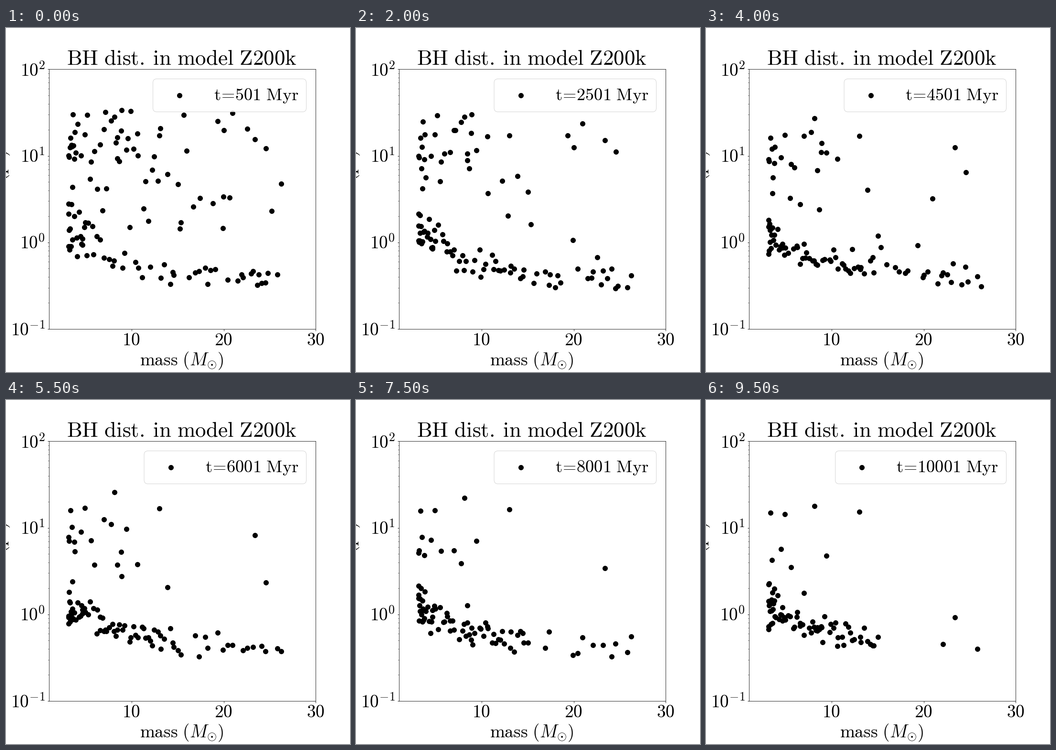
Write a matplotlib script that moves like this. It is 720 px wide and 720 px high and loops after 10 s.

```python
import numpy as np
import matplotlib.pyplot as plt
from matplotlib.animation import FuncAnimation
from matplotlib.patches import FancyBboxPatch

SIZE, FRAMES, INTERVAL = 720, 20, 500
COUNT = 128
HEAVY = 360  # stars right of this are lost over time

# Prominent outer stars: place, starting height, step at which they have sunk.
PROMINENT = np.array([
    (131, 267, 22), (132, 270, 21.5), (135, 230, 65), (138, 248, 25),
    (140, 181, 10), (143, 274, 22), (157, 267, 29), (165, 223, 46),
    (205, 212, 21), (227, 186, 38), (233, 273, 16), (241, 215, 15),
    (252, 255, 27), (275, 221, 14), (321, 225, 60), (456, 214, 8),
    (521, 233, 20), (544, 252, 14),
])


def belt_height(x, step, noise):
    depth = 1 - np.exp((130 - x) / 130)
    spread = 13 + 10 * np.exp((130 - x) / 60)
    return 434 + (96 - 0.8 * step) * depth + spread * noise


def make_stars(rng):
    """Place, starting height, sinking time and lifetime of every star."""
    n = COUNT - len(PROMINENT)
    rank = (np.arange(n) + rng.random(n)) / n
    x = 131 + 446 * rank ** 1.8
    outer = rng.random(n) < 0.48
    start = np.where(outer, 420 - 250 * rng.random(n) ** 1.5,
                     belt_height(x, 0, rng.normal(size=n).clip(-2, 2)))
    sink = np.where(outer, 1 + rng.exponential(6, n), 1)
    life = FRAMES * rng.random(n) ** 1.3 * np.where(x > HEAVY, 1, 16)

    px, pstart, psink = PROMINENT.T
    plife = np.where(px > HEAVY, psink, np.inf)
    return [np.append(a, b) for a, b in
            ((x, px), (start, pstart), (sink, psink), (life, plife))]


rng = np.random.default_rng(12)
X, START, SINK, LIFE = make_stars(rng)
NOISE = rng.normal(size=(FRAMES, COUNT)).clip(-2, 2)


def positions(step):
    sunk = np.minimum(step / SINK, 1) ** 3
    y = START + (belt_height(X, step, NOISE[step]) - START) * sunk
    alive = LIFE >= step
    return X[alive], y[alive]


plt.rcParams["mathtext.fontset"] = "cm"
fig = plt.figure(figsize=(SIZE / 72, SIZE / 72), dpi=72, facecolor="white")
ax = fig.add_axes([0.125, 0.125, 0.7755, 0.755])
ax.set(xlim=(1, 30), yscale="log", ylim=(0.1, 100), xticks=[10, 20, 30])
ax.tick_params(which="both", labelbottom=False, labelleft=False)

stage = fig.add_axes([0, 0, 1, 1])  # pixel coordinates, y downwards
stage.set(xlim=(0, SIZE), ylim=(SIZE, 0))
stage.axis("off")


def label(x, y, text, size=37.2, ha="center", **kwargs):
    return stage.text(x, y, text, fontsize=size, ha=ha, va="baseline", **kwargs)


label(368, 76.5, r"$\mathrm{BH\ dist.\:in\ model\ Z200k}$", 45)
label(368, 706, r"$\mathrm{mass}\ (M_{\odot})$")
label(-1, 255, r"$\mathrm{distance\ (pc)}$", ha="right",
      rotation=90, rotation_mode="anchor")
for value, x in ((10, 261.5), (20, 455), (30, 648)):
    label(x, 664, f"${value}$")
for power in range(-1, 3):
    label(82, 462.5 - 181.2 * power, f"$10^{{{power}}}$", ha="right")

dot_style = dict(ls="", marker="o", color="black", ms=10, mew=1)
dots, = stage.plot([], [], zorder=2, **dot_style)
box = FancyBboxPatch((0, 0), 1, 1, boxstyle="round,pad=0,rounding_size=8",
                     fc="white", ec="0.8", lw=1, alpha=0.8, zorder=4)
stage.add_patch(box)
legend_dot, = stage.plot([], [], zorder=5, **dot_style)
legend_text = label(0, 151, "", 36.4, ha="left", zorder=5)


def update(step):
    dots.set_data(*positions(step))
    age = 501 + 500 * step
    left = 307.5 - 18.4 * (len(str(age)) - 3)
    box.set_bounds(left, 106.5, 628.5 - left, 69)
    legend_dot.set_data([left + 55.7], [141])
    legend_text.set_x(left + 127.5)
    legend_text.set_text(rf"$\mathrm{{t\!=\!{age}\ Myr}}$")
    return dots, box, legend_dot, legend_text


anim = FuncAnimation(fig, update, frames=FRAMES, interval=INTERVAL,
                     repeat=True, repeat_delay=0)
plt.show()
```
